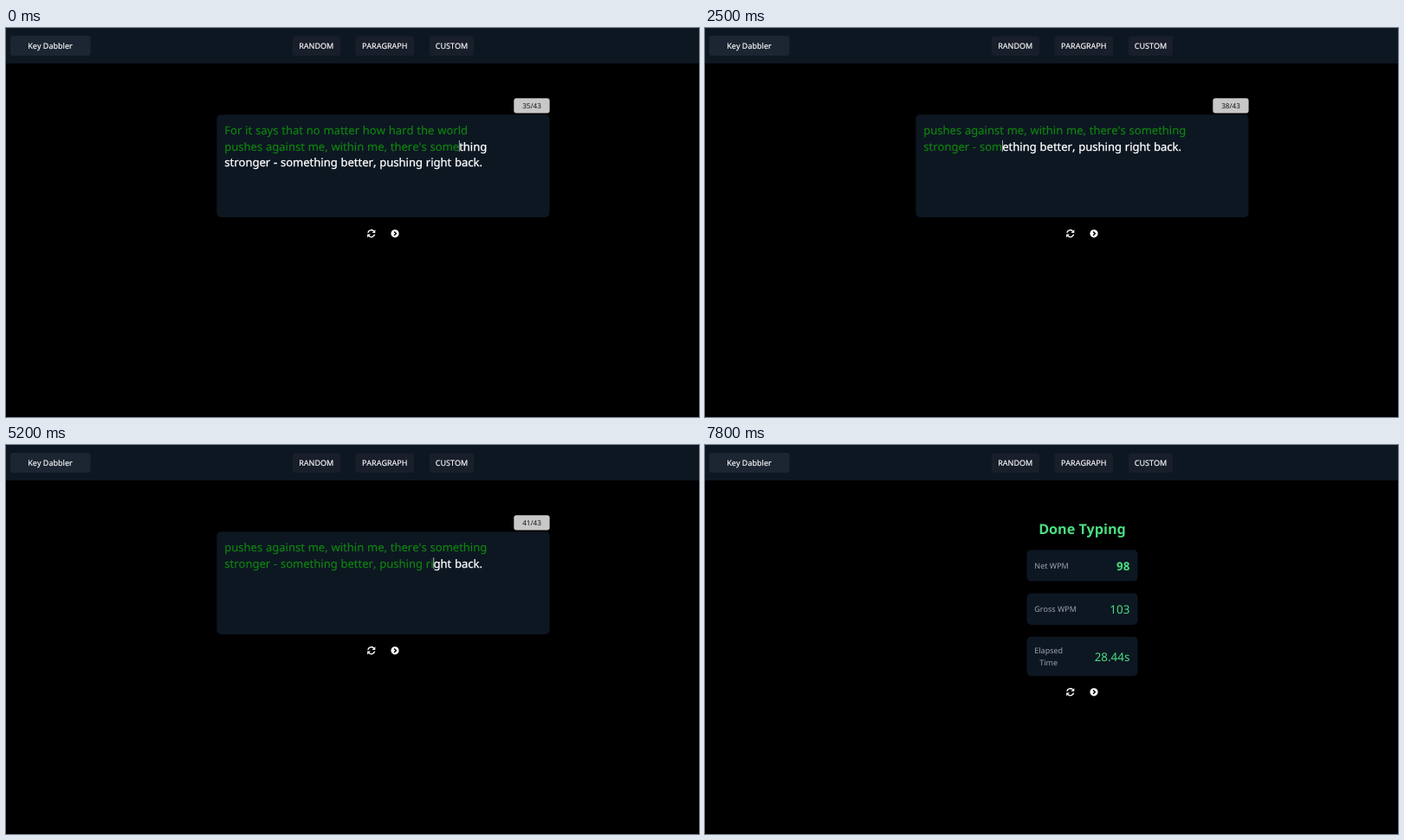
Write an HTML page that moves like this. It is 800 px wide and 450 px high and loops after 7.9 s.

```html
<!DOCTYPE html>
<html lang="en">
<head>
<meta charset="utf-8">
<title>Typing test</title>
<style>
  html, body { margin: 0; width: 100%; height: 100%; overflow: hidden; background: #000; }
  svg { display: block; width: 800px; height: 450px; }
  text { font-family: "Noto Sans", "Open Sans", sans-serif; font-size: 9px; fill: #fff;
         white-space: pre; text-rendering: geometricPrecision; font-kerning: none; }
  .mid { text-anchor: middle; }
  .end { text-anchor: end; }
  .panel { fill: #0d1722; }
  .nav { fill: #191e2b; }
  .menu text { stroke: #fff; stroke-width: .15px; }
  .line { font-size: 13px; word-spacing: .45px; }
  .rest { stroke: #fff; stroke-width: .3px; }
  .typed { fill: #108410; stroke: #108410; stroke-width: .15px; }
  .label { fill: #9ca3af; }
  .value { font-size: 13.4px; fill: #4ade80; }
  .title { font-size: 16.2px; fill: #4ade80; font-kerning: normal; }
  .bold { font-weight: 700; }
</style>
</head>
<body>
<svg viewBox="0 0 800 450">
  <rect width="800" height="450"/>
  <g class="menu">
    <rect class="panel" width="800" height="41"/>
    <rect x="5" y="9" width="92.5" height="23" rx="3" fill="#1b2632"/>
    <text class="mid" x="51" y="23.7">Key Dabbler</text>
    <rect class="nav" x="331" y="9.5" width="55" height="22.5" rx="3"/>
    <text class="mid" x="358.2" y="23.7">RANDOM</text>
    <rect class="nav" x="403.5" y="9.5" width="67.5" height="22.5" rx="3"/>
    <text class="mid" x="437.2" y="23.7">PARAGRAPH</text>
    <rect class="nav" x="489" y="9.5" width="51" height="22.5" rx="3"/>
    <text class="mid" x="514.5" y="23.7">CUSTOM</text>
  </g>

  <g id="test">
    <rect x="586.3" y="81.3" width="41.3" height="17.3" rx="3" fill="#c8c8c8"/>
    <text id="count" class="mid" x="607" y="93" style="font-size:8.1px;fill:#111"></text>
    <rect class="panel" x="243.3" y="100.3" width="384.2" height="118.6" rx="5"/>
    <g id="lines"></g>
    <rect id="caret" y="130" width="1" height="13" fill="#a5aaaf"/>
  </g>

  <g id="result">
    <text class="title bold mid" x="435.5" y="103">Done Typing</text>
    <rect class="panel" x="371.5" y="121.3" width="128" height="36.3" rx="5"/>
    <text class="label" x="380.3" y="142.7">Net WPM</text>
    <text class="value bold end" x="490.3" y="144.5">98</text>
    <rect class="panel" x="371.5" y="171.5" width="128" height="36.5" rx="5"/>
    <text class="label" x="380.3" y="192.9">Gross WPM</text>
    <text class="value end" x="490.3" y="194.7">103</text>
    <rect class="panel" x="371.5" y="221.8" width="128" height="45.4" rx="5"/>
    <text class="label mid" x="396.7" y="240.7">Elapsed</text>
    <text class="label mid" x="396.7" y="254.5">Time</text>
    <text class="value end" x="490.3" y="249.6">28.44s</text>
  </g>

  <g id="icons">
    <g transform="translate(421.7 0)">
      <g id="arrow">
        <path d="M-3.9-.9A4 4 0 0 1 2.9-2.8" fill="none" stroke="#fff" stroke-width="1.4"/>
        <path d="M4.6-4.6V-.8H.8Z" fill="#fff"/>
      </g>
      <use href="#arrow" transform="rotate(180)"/>
    </g>
    <g transform="translate(449 0)">
      <circle r="4.6" fill="#fff"/>
      <path d="M-.9-2.2 1.3 0-.9 2.2" fill="none" stroke="#000" stroke-width="1.5"/>
    </g>
  </g>
</svg>
<script>
const LOOP = 7900, STEP = 100, DONE = 6100;
const LEFT = 252.3, BASE = 123.4, LEADING = 18.4;
const LINES = [
  "For it says that no matter how hard the world",
  "pushes against me, within me, there's something ",
  "stronger - something better, pushing right back."
];
// [time, characters typed in the last line]; negative means still in the line before
const KEYS = [[0, -6], [100, -6], [600, 0], [900, 1], [1600, 8], [1800, 8], [2500, 14],
  [2600, 15], [3600, 25], [5200, 39], [5900, 47], [DONE, 47]];

const $ = id => document.getElementById(id);
const make = (tag, parent, cls) => {
  const el = document.createElementNS("http://www.w3.org/2000/svg", tag);
  el.setAttribute("class", cls);
  return parent.appendChild(el);
};
const rows = LINES.map(() => {
  const text = make("text", $("lines"), "line");
  text.setAttribute("x", LEFT);
  return { text, typed: make("tspan", text, "typed"), rest: make("tspan", text, "rest") };
});

function typedAt(t) {
  const i = KEYS.findIndex(key => key[0] > t);
  const [t0, n0] = KEYS[i - 1], [t1, n1] = KEYS[i];
  return Math.round(n0 + (n1 - n0) * (t - t0) / (t1 - t0));
}

function drawTest(t) {
  const n = typedAt(t);
  const scrolled = n >= 0 ? 1 : 0;
  const current = 1 + scrolled;
  const column = scrolled ? n : LINES[1].length + n;
  const words = scrolled ? 35 + LINES[2].slice(0, n).split(" ").length : 35;

  rows.forEach(({ text, typed, rest }, i) => {
    const cut = i < current ? LINES[i].length : i === current ? column : 0;
    typed.textContent = LINES[i].slice(0, cut);
    rest.textContent = LINES[i].slice(cut);
    text.setAttribute("y", BASE + (i - scrolled) * LEADING);
    text.style.display = i < scrolled ? "none" : "";
  });
  const width = column ? rows[current].text.getSubStringLength(0, column) : 0;
  $("caret").setAttribute("x", LEFT + width - .3);
  $("count").textContent = words + "/43";
}

function draw(now) {
  const t = Math.floor(now % LOOP / STEP) * STEP;
  const done = t >= DONE;
  $("test").style.display = done ? "none" : "";
  $("result").style.display = done ? "" : "none";
  $("icons").setAttribute("transform", `translate(0 ${done ? 285.8 : 237.8})`);
  if (!done) drawTest(t);
}

const start = performance.now();
function tick() {
  draw(performance.now() - start);
  requestAnimationFrame(tick);
}
tick();
</script>
</body>
</html>
```
